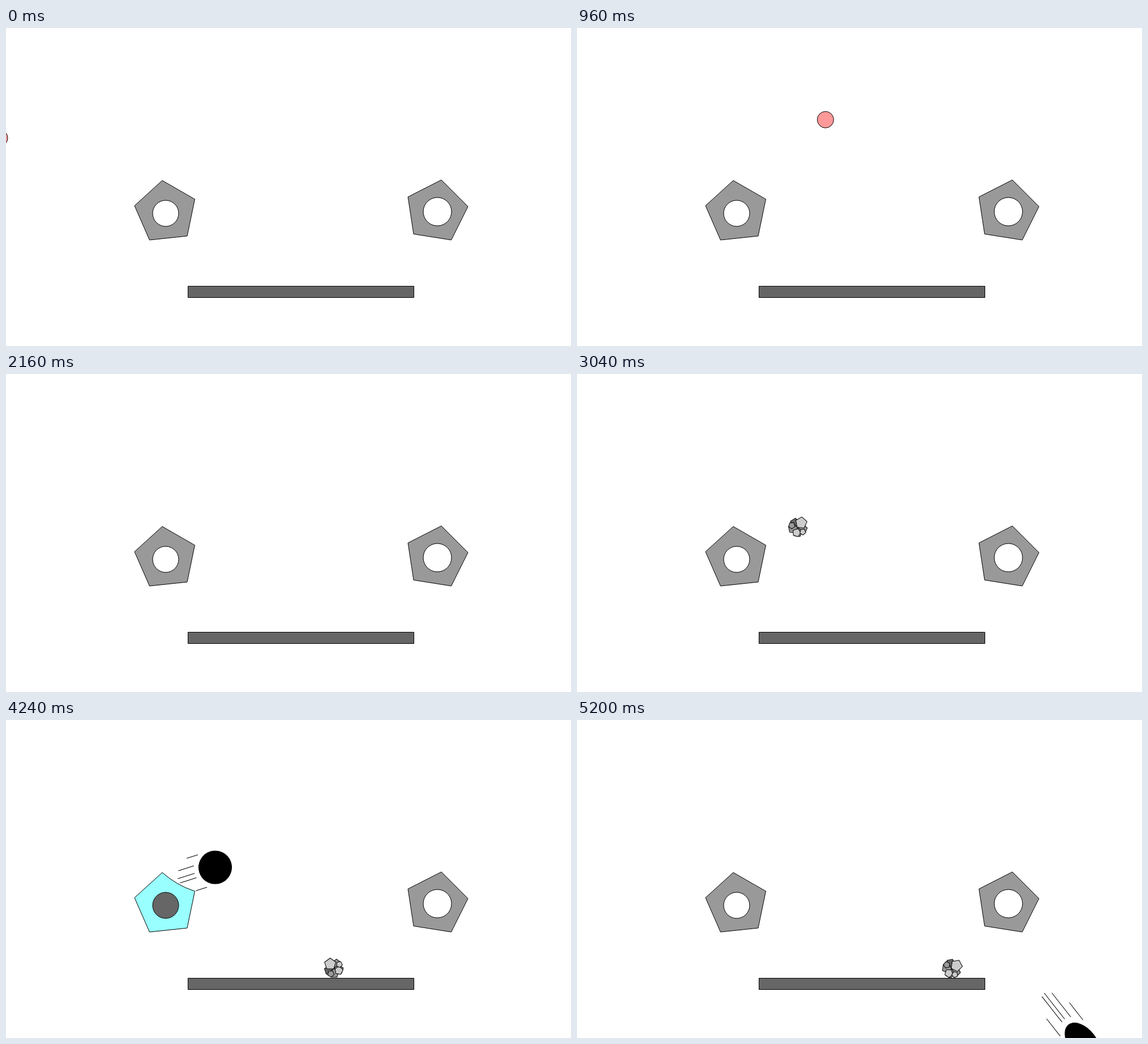
Animation of 998 by 561 pixels, one loop 5.28 s. Source, as an HTML page:

```html
<!DOCTYPE html>
<html lang="en">
<head>
<meta charset="utf-8">
<title>Bouncing balls</title>
<style>
  html, body { margin: 0; width: 100%; height: 100%; overflow: hidden; background: #fff; }
  svg { display: block; width: 100vw; height: 100vh; }
</style>
</head>
<body>
<svg id="stage" viewBox="0 0 998 561" stroke="#000" stroke-width="1"></svg>
<script>
const LOOP = 5280, STEP = 80;
const GRAVITY = 11 / (STEP * STEP);
const HIT_TIME = 160;
const RAD = Math.PI / 180;
const stage = document.getElementById('stage');

function set(el, attrs) {
  for (const k in attrs) el.setAttribute(k, attrs[k]);
}
function add(tag, attrs, parent = stage) {
  const el = document.createElementNS('http://www.w3.org/2000/svg', tag);
  set(el, attrs);
  return parent.appendChild(el);
}
function show(el, on) {
  el.setAttribute('visibility', on ? 'visible' : 'hidden');
}

// Position at time t along bounces [time, x, y, spin].
// Between bounces the path is a parabola; equal heights mean rolling.
function fly(bounces, t) {
  let i = 0;
  while (i < bounces.length - 2 && t > bounces[i + 1][0]) i++;
  const a = bounces[i], b = bounces[i + 1];
  const u = Math.max(0, Math.min(1, (t - a[0]) / (b[0] - a[0])));
  const [x, y, spin] = a.map((n, k) => n + (b[k] - n) * u).slice(1);
  const lift = a[2] === b[2] ? 0 : 0.5 * GRAVITY * u * (1 - u) * (b[0] - a[0]) ** 2;
  return { x, y: y - lift, spin };
}

// Closed polygon; one edge may sag inwards.
function outline(pts, edge = -1, depth = 0) {
  return 'M' + pts[0] + pts.map(([x, y], i) => {
    const [x2, y2] = pts[(i + 1) % pts.length];
    if (i !== edge) return `L${x2},${y2}`;
    const dx = x2 - x, dy = y2 - y, k = depth / Math.hypot(dx, dy);
    return `Q${(x + x2) / 2 - dy * k},${(y + y2) / 2 + dx * k} ${x2},${y2}`;
  }).join('') + 'Z';
}

// Obstacles; hits are [time, edge].
const bodies = [
  {
    pts: [[276, 269], [333.5, 302], [320, 367], [253.5, 374], [227, 313.5]],
    fill: '#999', hole: [282, 327, 23], depth: 14,
    hits: [[240, 0], [2880, 0], [4160, 0], [4800, 1]]
  },
  {
    pts: [[769, 268], [816, 315], [786.5, 374], [720, 363.5], [710, 298]],
    fill: '#999', hole: [762, 324, 25], depth: 14,
    hits: [[1545, 4], [4380, 3], [4960, 3]]
  },
  {
    pts: [[321.5, 455.5], [720.5, 455.5], [720.5, 475.5], [321.5, 475.5]],
    fill: '#666', depth: 21,
    hits: [[1165, 0], [3385, 0], [4620, 0]]
  }
];
for (const b of bodies) {
  b.el = add('path', {});
  if (b.hole) {
    const [cx, cy, r] = b.hole;
    b.dot = add('circle', { cx, cy, r });
  }
}

function drawBody(b, t) {
  const hit = b.hits.find(([at]) => t >= at && t < at + HIT_TIME);
  const d = hit ? outline(b.pts, hit[1], b.depth * (1 - (t - hit[0]) / HIT_TIME)) : outline(b.pts);
  set(b.el, { d, fill: hit ? '#9ff' : b.fill });
  if (b.dot) set(b.dot, { fill: hit ? '#666' : '#fff' });
}

const redPath = [
  [0, -11.5, 194], [240, 312, 270], [560, 317, -20], [800, 360, -6],
  [1165, 540, 441], [1545, 733, 270], [2000, 741, -13], [2160, 741, -13]
];
const rockPath = [
  [2640, 290, -40, -80], [2880, 320, 262, -40], [3385, 541, 438, 86],
  [3680, 579, 438, 282], [4560, 579, 438, 282], [4620, 592, 438, 288],
  [4930, 648, 438.5, 307], [5200, 662, 438.5, 380]
];
const heavyPath = [
  [3920, 290, -100], [4160, 320, 281], [4240, 369.5, 260], [4380, 683, 320],
  [4620, 396, 435], [4800, 356.4, 357], [4960, 712, 388], [5200, 893, 569]
];

const red = add('circle', { r: 14.5, fill: '#f99' });

// A cluster of pentagons: dark core, grey ring, lighter stones in front
const rock = add('g', {});
function stone(angle, dist, r, fill) {
  const x = dist * Math.cos(angle * RAD), y = dist * Math.sin(angle * RAD);
  const pts = [0, 1, 2, 3, 4].map(i => {
    const a = (angle + 40 + i * 72) * RAD;
    return [x + r * Math.cos(a), y + r * Math.sin(a)];
  });
  add('path', { d: outline(pts), fill }, rock);
}
stone(0, 0, 10, '#333');
for (let i = 0; i < 5; i++) stone(-124 + 72 * i, 9, 8.5, i ? '#999' : '#666');
stone(196, 11, 6, '#999');
stone(-52, 9.8, 10.5, '#ccc');
stone(102, 9.8, 7.5, '#ccc');
stone(43, 12, 5.5, '#ccc');

// The heavy ball points along its motion, with streaks behind it
const heavy = add('g', {});
const ball = add('ellipse', { fill: '#000' }, heavy);
const streaks = [-1.05, -0.48, -0.03, 0.26, 1].map(side => ({ side, el: add('line', {}, heavy) }));

function drawHeavy(t) {
  const { x, y } = fly(heavyPath, t), prev = fly(heavyPath, t - 2);
  const vx = (x - prev.x) * STEP / 2, vy = (y - prev.y) * STEP / 2;
  const speed = Math.min(100, Math.hypot(vx, vy));
  const pull = Math.max(0, Math.min(60, Math.abs(vy) - 16));
  const rx = 29 + 0.18 * pull, ry = 29 - Math.min(5, 0.3 * pull);
  set(heavy, { transform: `translate(${x} ${y}) rotate(${Math.atan2(vy, vx) / RAD})` });
  set(ball, { rx, ry });
  for (const { side, el } of streaks) {
    const near = -rx * Math.sqrt(1.7 - side * side);
    const len = speed * (0.4 + 0.2 * Math.max(0, 1 - side * side));
    set(el, { x1: near, x2: near - len, y1: side * ry, y2: side * ry });
  }
}

function draw(t) {
  bodies.forEach(b => drawBody(b, t));

  show(red, t < 2160);
  const r = fly(redPath, t);
  set(red, { cx: r.x, cy: r.y });

  show(rock, t > 2640);
  const k = fly(rockPath, t);
  set(rock, { transform: `translate(${k.x} ${k.y}) rotate(${k.spin})` });

  show(heavy, t > 3920);
  drawHeavy(t);
}

const start = performance.now();
function tick() {
  const t = (performance.now() - start) % LOOP;
  draw(Math.floor(t / STEP) * STEP);
  requestAnimationFrame(tick);
}
tick();
</script>
</body>
</html>
```
